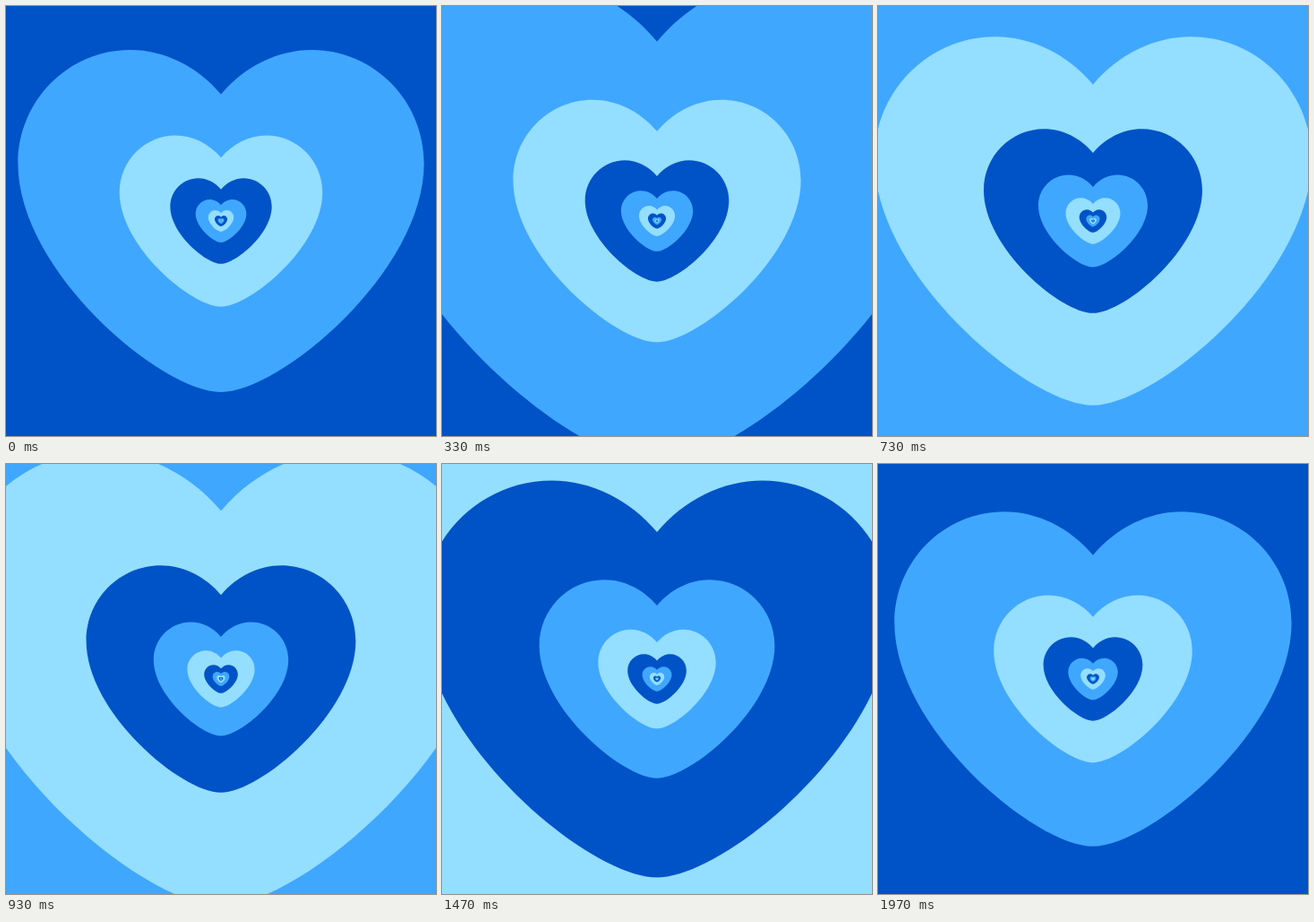
Animation, 480 px wide and 480 px high, one loop 2010 ms. Source, as an HTML page with a canvas:

```html
<!DOCTYPE html>
<html lang="en">
<head>
<meta charset="utf-8">
<title>Endless hearts</title>
<style>
  html, body { margin: 0; width: 100%; height: 100%; overflow: hidden; background: #0053c6; }
  canvas { display: block; }
</style>
</head>
<body>
<canvas id="stage" width="480" height="480"></canvas>
<script>
const ctx = document.getElementById('stage').getContext('2d');
const COLORS = ['#40a7ff', '#94deff', '#0053c6'];
const LOOP = 2010, STEPS = 60, RINGS = 11;

// Heart around the zoom centre
const heart = new Path2D(
  'M0-141C26-172 63-190.5 101-190.5C170-190.5 226-134 226-64C226 56 66 190.5 0 190.5' +
  'C-66 190.5-226 56-226-64C-226-134-170-190.5-101-190.5C-63-190.5-26-172 0-141Z');

function draw(time) {
  const step = Math.min(STEPS - 1, Math.floor((time % LOOP + 3.4) * 0.03));
  const zoom = 0.004 + step * 0.0503; // doublings so far

  ctx.resetTransform();
  ctx.fillStyle = COLORS[2];
  ctx.fillRect(0, 0, 480, 480);
  for (let n = -1; n < RINGS; n++) {
    const scale = 2 ** (zoom - n);
    ctx.setTransform(scale, 0, 0, scale, 240, 240);
    ctx.fillStyle = COLORS[(n + 3) % 3];
    ctx.fill(heart);
  }
}

const start = performance.now();
function tick() {
  draw(performance.now() - start);
  requestAnimationFrame(tick);
}
tick();
</script>
</body>
</html>
```
